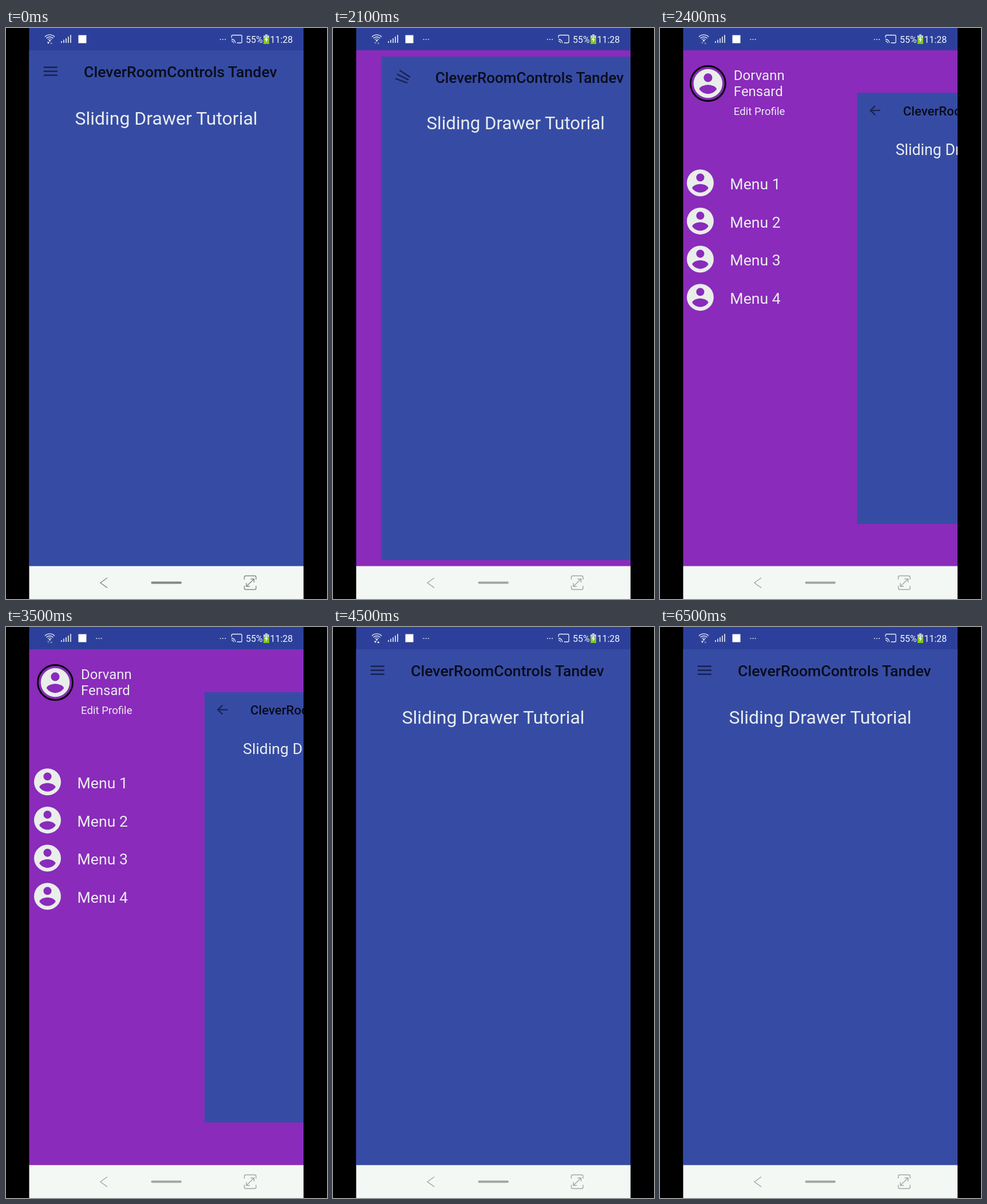
Write an HTML page without scripts that moves like this. It is 561 px wide and 998 px high and loops after 6.6 s.

```html
<!DOCTYPE html>
<html lang="en">
<head>
<meta charset="utf-8">
<title>Sliding drawer</title>
<style>
  /* --p: how far the drawer is open, --turn: spin direction of the menu icon */
  @property --p { syntax: "<number>"; inherits: true; initial-value: 0; }
  @property --turn { syntax: "<number>"; inherits: true; initial-value: -1; }

  html, body { margin: 0; width: 100%; height: 100%; overflow: hidden; background: #000; }
  svg { display: block; width: 100vw; height: 100vh; }
  text { font-family: Roboto, "Open Sans", sans-serif; fill: #e9edee; }

  .screen { animation: drawer 6.6s step-end infinite; }
  .menu { transform: translateX(calc(-267px * (1 - var(--p)))); }
  .page {
    transform: translate(calc(40px + 307px * var(--p)), 490px)
               scale(calc(1 - .1665 * var(--p)));
  }

  .icon { fill: #1a2353; transform: rotate(calc(var(--turn) * 180deg * (1 - var(--p)))); }
  .shaft {
    transform: translateX(calc(-12px + 1.33px * var(--p)))
               scaleX(calc(24 - 2.67 * var(--p)));
  }
  .arm {
    transform: translate(calc(-12px + 1.33px * var(--p)), calc(6.9px - 7.8px * var(--p)))
               rotate(calc(45deg * var(--p)))
               scaleX(calc(24 - 8.92 * var(--p)));
  }
  .flip { transform: scaleY(-1); }

  .title { font-size: 26.67px; font-weight: 500; fill: #090c1c; }
  .head { font-size: 32px; text-anchor: middle; }
  .name { font-size: 24px; }
  .edit { font-size: 18.67px; }
  .item { font-size: 26.67px; }
  .clock { font-size: 16px; fill: #f4f6fb; }

  .line { fill: none; stroke: #edf0f8; stroke-width: 1.3; }
  .dots { fill: #dfe4f2; }
  .more { animation: more 6.6s linear infinite; }
  .down { animation: down 6.6s step-end infinite; }
  .up { animation: up 6.6s step-end infinite; }
  .nav { color: #a4a6a5; animation: dim 6.6s linear infinite; }
  .nav path { fill: none; stroke: currentColor; stroke-width: 1.4; }

  @keyframes drawer {
    0% { --p: 0; --turn: -1; }
    31.818% { --p: .147; }
    33.333% { --p: .723; }
    34.848% { --p: .936; }
    36.363% { --p: .992; }
    37.878% { --p: 1; --turn: -1; }
    50% { --p: 1; --turn: 1; }
    62.121% { --p: .283; }
    63.636% { --p: .067; }
    65.151% { --p: .008; }
    66.666%, 100% { --p: 0; --turn: 1; }
  }
  @keyframes more {
    0%, 1.5% { opacity: 0; }
    6%, 100% { opacity: 1; }
  }
  @keyframes down {
    0% { opacity: 1; }
    1.515% { opacity: .4; }
    68.181% { opacity: 1; }
    81.818% { opacity: .4; }
    98.484%, 100% { opacity: 1; }
  }
  @keyframes up {
    0% { opacity: .4; }
    68.181% { opacity: 1; }
    81.818%, 100% { opacity: .4; }
  }
  @keyframes dim {
    0%, 1.5% { color: #858786; }
    21%, 100% { color: #a4a6a5; }
  }
</style>
</head>
<body>
<svg viewBox="0 0 561 998" preserveAspectRatio="none">
  <defs>
    <clipPath id="body"><rect x="40.5" y="39" width="479.5" height="902"/></clipPath>
    <path id="user" fill="#e9eeea" fill-rule="evenodd" d="M0-10a10 10 0 1 0 0 20a10 10 0 1 0 0-20z
      M0-7a3 3 0 1 1 0 6a3 3 0 1 1 0-6z
      M0 7.2C-2.5 7.2-4.71 5.92-6 3.98C-5.97 1.99-2 .9 0 .9S5.97 1.99 6 3.98C4.71 5.92 2.5 7.2 0 7.2z"/>
    <g id="trio">
      <circle cx="-4.2" r="1"/><circle r="1"/><circle cx="4.2" r="1"/>
    </g>
    <rect id="bar" y="-1.33" width="1" height="2.67"/>
  </defs>

  <rect width="561" height="998"/>

  <g class="screen" clip-path="url(#body)">
    <rect x="40" y="39" width="480" height="902" fill="#8a2bbb"/>

    <g class="menu">
      <circle cx="86" cy="97" r="30.5" fill="none" stroke="#08040b" stroke-width="3"/>
      <use href="#user" transform="translate(86 97) scale(2.52)"/>
      <text class="name" x="131" y="91">Dorvann</text>
      <text class="name" x="131" y="119">Fensard</text>
      <text class="edit" x="131" y="152">Edit Profile</text>

      <use href="#user" transform="translate(72.5 270.7) scale(2.35)"/>
      <use href="#user" transform="translate(72.5 337.4) scale(2.35)"/>
      <use href="#user" transform="translate(72.5 404) scale(2.35)"/>
      <use href="#user" transform="translate(72.5 470.7) scale(2.35)"/>
      <text class="item" x="124.5" y="282">Menu 1</text>
      <text class="item" x="124.5" y="348.7">Menu 2</text>
      <text class="item" x="124.5" y="415.3">Menu 3</text>
      <text class="item" x="124.5" y="482">Menu 4</text>
    </g>

    <g class="page">
      <g transform="translate(-40 -490)">
        <rect x="40" y="39" width="480" height="902" fill="#364ca4"/>
        <g transform="translate(77.8 75.6)">
          <g class="icon">
            <use href="#bar" class="shaft"/>
            <use href="#bar" class="arm"/>
            <g class="flip"><use href="#bar" class="arm"/></g>
          </g>
        </g>
        <text class="title" x="136" y="86">CleverRoomControls Tandev</text>
        <text class="head" x="280" y="169">Sliding Drawer Tutorial</text>
      </g>
    </g>
  </g>

  <!-- status bar -->
  <rect x="40.5" width="479.5" height="39" fill="#2c409b"/>
  <g class="line">
    <path d="M68 15.5a12 12 0 0 1 17 0M70.5 18a8.5 8.5 0 0 1 12 0M73 20.4a5 5 0 0 1 7 0"/>
    <path d="M97 26v-3M101 26v-5.500M105 26v-8M109 26v-11M113 26v-14" stroke-width="1.6"/>
    <path d="M394.200 17v-2.500a2 2 0 0 1 2-2h14a2 2 0 0 1 2 2v9.500a2 2 0 0 1-2 2h-6.500"/>
    <path d="M394 19.500a6.800 6.800 0 0 1 6.800 6.800M394 22.700a3.600 3.600 0 0 1 3.600 3.600"/>
  </g>
  <path d="M74.400 21.700a3 3 0 0 1 4.200 0l-2.100 2.200z" fill="#edf0f8"/>
  <path class="down" d="M71.800 24.500h4.400l-2.200 3.500z" fill="#edf0f8"/>
  <path class="up" d="M77 28h4.400l-2.200-3.500z" fill="#edf0f8"/>
  <rect x="126.500" y="12.500" width="14" height="14" fill="#fff"/>
  <use href="#trio" class="dots more" x="162.500" y="20"/>
  <use href="#trio" class="dots" x="379" y="20"/>
  <text class="clock" x="419" y="26">55%</text>
  <path d="M453 11h4v2h3v15h-10v-15h3z" fill="#b9c6cf"/>
  <path d="M450 17.500h10v10.500h-10z" fill="#7dc51f"/>
  <path d="M456.300 14.500l-4.300 6.500h2.600l-1 5l4.400-6.600h-2.700z" fill="#fff"/>
  <text class="clock" x="461.500" y="26">11:28</text>

  <!-- navigation bar -->
  <rect x="40.500" y="940.500" width="479.500" height="57.500" fill="#f3f8f5"/>
  <g class="nav">
    <path d="M177 961l-12 8.700l12 8.700"/>
    <rect x="253.500" y="967.500" width="53.500" height="4" rx="2" fill="currentColor"/>
    <path d="M416.500 964v-4a2.500 2.500 0 0 1 2.500-2.500h15.500a2.500 2.500 0 0 1 2.500 2.500v4
      M416.500 975v4a2.500 2.500 0 0 0 2.500 2.500h15.500a2.500 2.500 0 0 0 2.500-2.500v-4"/>
    <path d="M420 976l13.500-13M427.500 963h6v6M420 970v6h6"/>
  </g>
</svg>
</body>
</html>
```
